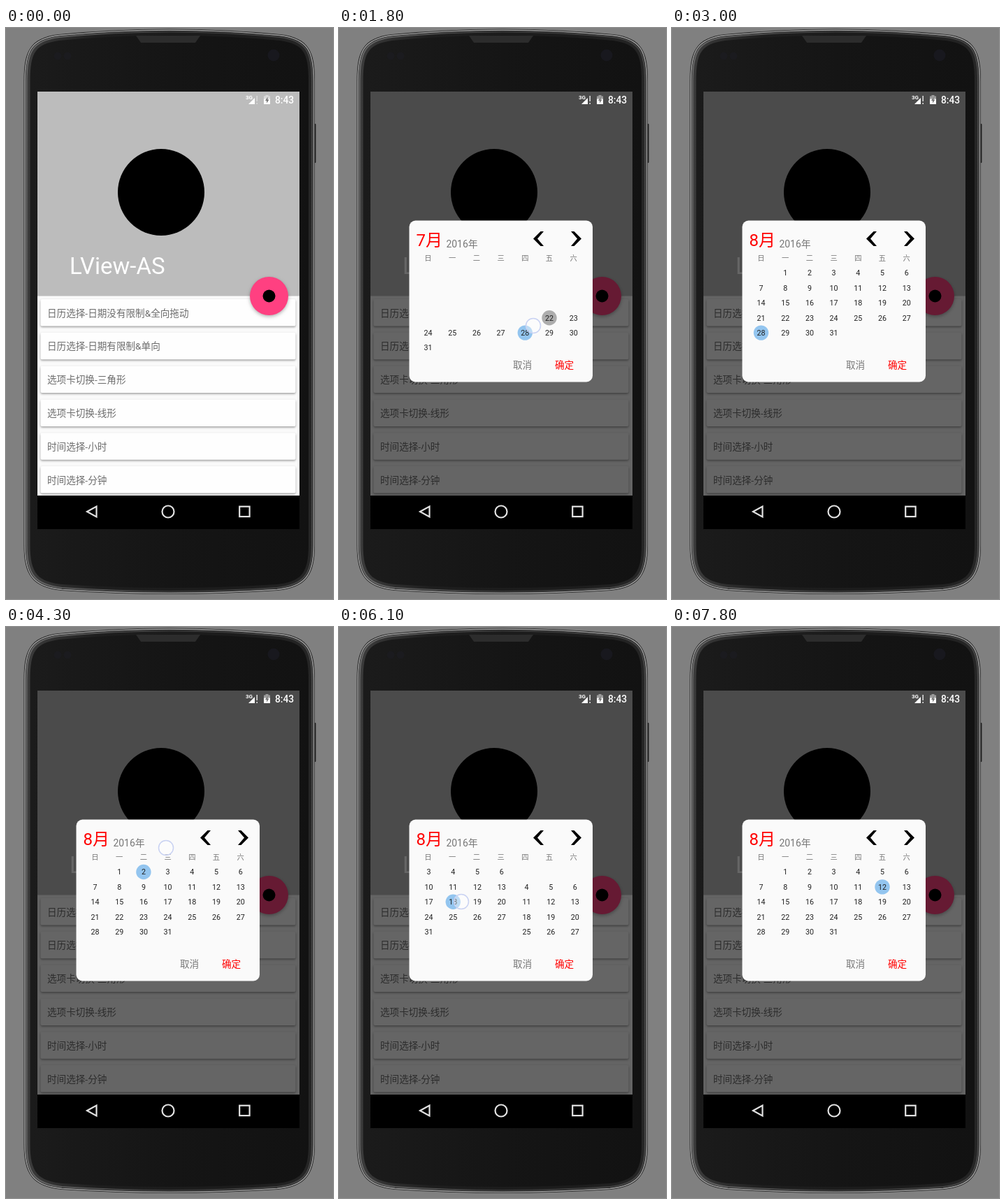
Animation, 468 px wide and 817 px high, one loop 8000 ms. Source, as an HTML page with a canvas:

```html
<!DOCTYPE html>
<html lang="zh-CN">
<head>
<meta charset="utf-8">
<style>
html, body { margin: 0; width: 468px; height: 817px; overflow: hidden; background: #808080; }
canvas { display: block; }
</style>
</head>
<body>
<canvas id="stage" width="468" height="817"></canvas>
<script>
const ctx = document.getElementById('stage').getContext('2d');
const LOOP = 8000, STEP = 100;
const FONT = 'Roboto, "Noto Sans CJK SC", "Noto Sans CJK", sans-serif';
const ITEMS = ['日历选择-日期没有限制&全向拖动', '日历选择-日期有限制&单向', '选项卡切换-三角形',
  '选项卡切换-线形', '时间选择-小时', '时间选择-分钟'];
const MONTHS = [
  { name: '7月', offset: 5, first: 22, last: 31, today: 22 },
  { name: '8月', offset: 1, first: 1, last: 31 },
  { name: '9月', offset: 4, first: 1, last: 30 }
];
const GRID = { left: 110, width: 244, x: 127.5, dx: 34.7, y: 350.5, dy: 21.4 };
const SWIPES = [
  { press: 1800, drag: 1900, release: 2500, end: 2900, x0: 278, x1: 84, y: 426, day: 28, from: 0, to: 1 },
  { press: 5700, drag: 5800, release: 6300, end: 6600, x0: 278, x1: 119, y: 393, day: 18, from: 1, to: 2 },
  { press: 7100, drag: 7100, release: 7500, end: 7800, x0: 167, x1: 341, y: 393, day: 12, from: 2, to: 1 }
];

const progress = (t, a, b) => Math.min(1, Math.max(0, (t - a) / (b - a)));
const mix = (a, b, p) => a + (b - a) * p;
const easeOut = p => 1 - (1 - p) ** 2;
const smooth = p => p * p * (3 - 2 * p);

function rect(x, y, w, h, color, r = 0) {
  ctx.fillStyle = color;
  ctx.beginPath();
  ctx.roundRect(x, y, w, h, r);
  ctx.fill();
}

function disc(x, y, r, color) {
  ctx.fillStyle = color;
  ctx.beginPath();
  ctx.arc(x, y, r, 0, 7);
  ctx.fill();
}

function ring(x, y, r, color, width) {
  ctx.strokeStyle = color;
  ctx.lineWidth = width;
  ctx.beginPath();
  ctx.arc(x, y, r, 0, 7);
  ctx.stroke();
}

function line(path, color, width) {
  ctx.strokeStyle = color;
  ctx.lineWidth = width;
  ctx.stroke(new Path2D(path));
}

function fill(path, color) {
  ctx.fillStyle = color;
  ctx.fill(new Path2D(path));
}

function text(str, x, y, size, color, align = 'left', weight = 400) {
  ctx.font = `${weight} ${size}px ${FONT}`;
  ctx.textAlign = align;
  ctx.fillStyle = color;
  ctx.fillText(str, x, y);
}

function shadow(color, blur, y) {
  ctx.shadowColor = color;
  ctx.shadowBlur = blur;
  ctx.shadowOffsetY = y;
}

const noShadow = () => shadow('transparent', 0, 0);

function sideways(x0, x1, ...colors) {
  const g = ctx.createLinearGradient(x0, 0, x1, 0);
  colors.forEach((c, i) => g.addColorStop(i / (colors.length - 1), c));
  return g;
}

// Phone outline, inset by d
function body(d) {
  const l = 25.5 + d, r = 442 - d, t = 1 + d, b = 810 - d;
  return `M${l} 76C${l} 34 ${l + 8} ${t + 13} 76 ${t + 8}Q234 ${t - 7} 392 ${t + 8}` +
    `C${r - 8} ${t + 13} ${r} 34 ${r} 76V740C${r} 782 ${r - 12} ${b - 9} 388 ${b - 5}` +
    `Q234 ${b + 5} 80 ${b - 5}C${l + 12} ${b - 9} ${l} 782 ${l} 740Z`;
}

function drawPhone() {
  rect(0, 0, 468, 817, '#808080');
  rect(440, 137, 3.5, 56, '#222', 1);
  fill(body(0), '#1c1c1c');
  line(body(1.5), '#a0a0a0', 1.5);
  fill(body(3), sideways(28, 440, '#3c3c3c', '#1e1e1e', '#1c1c1c', '#1c1c1c', '#262626'));
  line(body(4), sideways(28, 440, '#666', '#333', '#444'), 2);
  fill(body(9), sideways(36, 432, '#1b1b1b', '#151515', '#121212'));
  fill('M186 11H278L271 21H193Z', '#2c2c2c');
  disc(74, 40, 5.5, '#1b1b1f');
  disc(88, 40, 5.5, '#1b1b1f');
  disc(383, 39, 8.5, '#18181e');
}

function drawNavBar() {
  rect(45, 669, 375, 48, '#000');
  line('M116 692L129.5 684.5V699.5Z', '#e2e2e2', 2.2);
  ring(232, 692, 8.5, '#e2e2e2', 2.2);
  ctx.strokeRect(334.2, 684.7, 14.4, 14.4);
}

function drawHome() {
  rect(45, 91, 375, 578, '#fafafa');
  rect(45, 91, 375, 292.5, '#bcbcbc');
  disc(222, 235, 62, '#000');
  text('LView-AS', 91, 352, 33, '#fff');
  ITEMS.forEach((label, i) => {
    const y = 388 + i * 47.8;
    shadow('rgba(0,0,0,.38)', 3, 1.5);
    rect(49.5, y, 365, 38.5, '#fefefe', 2);
    noShadow();
    text(label, 59, y + 24.5, 13.6, '#6c6c6c');
  });
  shadow('rgba(0,0,0,.3)', 5, 2);
  disc(376.5, 383.5, 27.5, '#ff4081');
  noShadow();
  disc(376.5, 383.5, 9, '#000');
}

function drawStatus() {
  text('3G', 343, 102, 8, '#fff', 'left', 700);
  fill('M347 109L356 100V109Z', '#fff');
  rect(358.4, 97, 1.6, 8, '#d8d8d8');
  rect(358.4, 107, 1.6, 2, '#d8d8d8');
  fill('M371.5 96H375.5V97.5H378V109H369V97.5H371.5Z', 'rgba(255,255,255,.45)');
  rect(369, 101.5, 9, 7.5, '#fff');
  fill('M374.5 98.5L371 104H373V107.5L376.5 102.5H374.5Z', '#777');
  text('8:43', 385, 107.5, 13.8, '#fff', 'left', 500);
}

function drawMonth(month, shift, selected) {
  for (let day = month.first; day <= month.last; day++) {
    const cell = month.offset + day - 1;
    const x = GRID.x + cell % 7 * GRID.dx + shift;
    const y = GRID.y + Math.floor(cell / 7) * GRID.dy;
    if (day === selected) disc(x, y, 10.7, '#93c5ef');
    else if (day === month.today) disc(x, y, 10.7, '#adadad');
    text(day, x, y + 3.9, 10.7, '#202020', 'center');
  }
}

function calendarState(t) {
  const state = { page: 0, title: 0, month: 0, day: 22, touch: null };
  for (const s of SWIPES) {
    if (t < s.press) break;
    const dragged = smooth(progress(t, s.drag, s.release));
    const x = mix(s.x0, s.x1, dragged);
    const pulled = s.from - (x - s.x0) / GRID.width;
    state.page = mix(pulled, s.to, easeOut(progress(t, s.release, s.end)));
    state.title = t < s.release ? s.from : s.to;
    state.month = t < s.end ? s.from : s.to;
    state.day = s.day;
    state.touch = t < s.release ? [x, s.y] : null;
  }
  if (t >= 3500 && t < 5700) {
    state.day = 2;
    if (t < 3900) state.touch = [205, 352];
    if (t >= 4200 && t < 5400) state.touch = [229, mix(316, 421, smooth(progress(t, 4600, 5000)))];
  }
  return state;
}

function drawDialog(t) {
  const { page, title, month, day, touch } = calendarState(t);
  rect(100.5, 275.5, 262.5, 231, '#fafafa', 9);
  text(MONTHS[title].name, 110.5, 311.5, 24, '#f00');
  text('2016年', 153.5, 314, 13.9, '#777');
  fill('M278 301.5L288.5 291H293L284 301.5L293 312H288.5Z', '#000');
  fill('M347 301.5L336.5 291H332L341 301.5L332 312H336.5Z', '#000');
  [...'日一二三四五六'].forEach((name, i) =>
    text(name, GRID.x + i * GRID.dx, 332.8, 10.3, '#777', 'center'));
  ctx.save();
  ctx.beginPath();
  ctx.rect(GRID.left, 337, GRID.width, 133);
  ctx.clip();
  MONTHS.forEach((m, i) => {
    if (Math.abs(i - page) < 1) drawMonth(m, (i - page) * GRID.width, i === month ? day : 0);
  });
  ctx.restore();
  text('取消', 249, 487, 13.6, '#777');
  text('确定', 309, 487, 13.6, '#f00');
  if (touch) {
    disc(...touch, 10.5, 'rgba(255,255,255,.4)');
    ring(...touch, 10.5, '#c9d2f2', 1.5);
  }
}

function draw(now) {
  const t = Math.floor(now % LOOP / STEP) * STEP;
  drawPhone();
  drawHome();
  if (t >= 500) {
    rect(45, 91, 375, 578, `rgba(0,0,0,${0.6 * progress(t, 450, 800) ** 1.7})`);
    ctx.globalAlpha = progress(t, 490, 705);
    drawDialog(t);
    ctx.globalAlpha = 1;
  }
  drawStatus();
  drawNavBar();
}

const start = performance.now();
function tick() {
  draw(performance.now() - start);
  requestAnimationFrame(tick);
}
tick();
</script>
</body>
</html>
```
